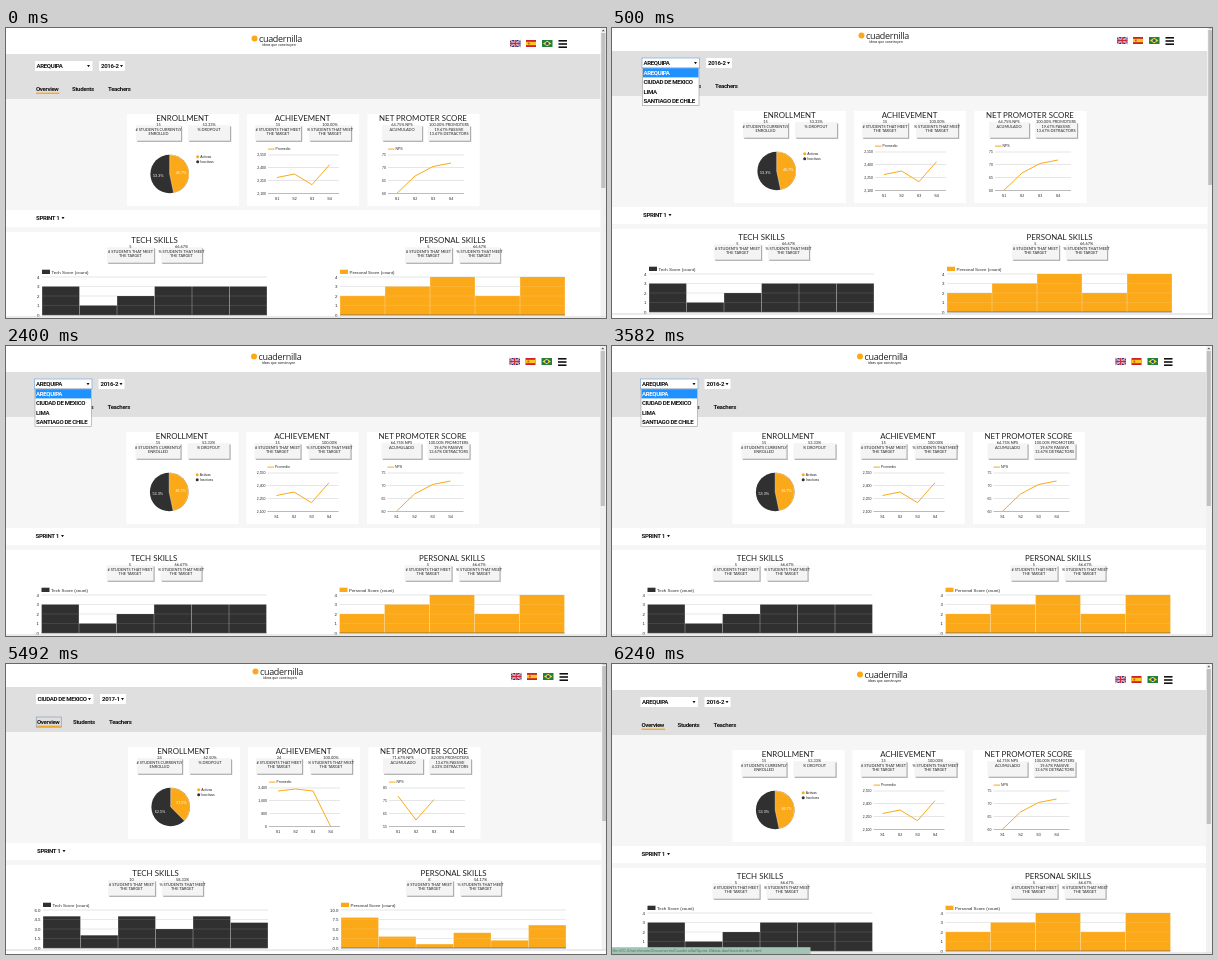
Animation, 600 px wide and 290 px high, one loop 8000 ms. Source, as an HTML page:

```html
<!DOCTYPE html>
<html lang="en">
<head>
<meta charset="utf-8">
<title>School dashboard</title>
<style>
html, body { margin: 0; width: 100%; height: 100%; overflow: hidden; background: #fff; }
svg { display: block; width: 600px; height: 290px; }
text { white-space: pre; fill: #222; }
.narrow { font-family: Roboto, "Liberation Sans", sans-serif; font-weight: 700; letter-spacing: -.35px; fill: #111; }
.wide { font-family: Lato, sans-serif; }
.chart { font-family: "Liberation Sans", Arial, sans-serif; }
.logo { font-family: "Open Sans", "Noto Sans", sans-serif; letter-spacing: -.3px; }
</style>
</head>
<body>
<svg id="stage" viewBox="0 0 600 290"></svg>
<script>
const ORANGE = '#fba919', DARK = '#303030';

const rect = (x, y, w, h, fill, more = '') =>
  `<rect x="${x}" y="${y}" width="${w}" height="${h}" fill="${fill}" ${more}/>`;
const path = (d, more) => `<path d="${d}" ${more}/>`;
const circle = (x, y, r, fill) => `<circle cx="${x}" cy="${y}" r="${r}" fill="${fill}"/>`;
// y is the vertical middle of the capitals
const text = (x, y, str, size, cls, more = '') =>
  `<text x="${x}" y="${y + size * .36}" font-size="${size}" class="${cls}" ${more}>${str}</text>`;
const label = (x, y, str, more) => text(x, y, str, 6.1, 'narrow', more);
const MID = 'text-anchor="middle"', END = 'text-anchor="end"';
const heading = (x, y, str) => text(x, y, str, 7.9, 'wide', MID);
const arrow = (x, y) => path(`M${x - 1.5} ${y - 1}h3l-1.5 2.2z`, 'fill="#111"');

const cities = ['AREQUIPA', 'CIUDAD DE MEXICO', 'LIMA', 'SANTIAGO DE CHILE'];
const arequipa = {
  city: cities[0], term: '2016-2',
  enroll: ['15', '53.33%'], achieve: ['15', '100.00%'],
  nps: ['64.75% NPS', '100.00% PROMOTERS', '19.67% PASSIVE', '13.67% DETRACTORS'],
  active: 46.7,
  scoreAxis: ['2,550', '2,400', '2,250', '2,100'], score: [149.5, 146, 156.7, 136.7],
  npsAxis: [75, 70, 65, 60], npsLine: [165.2, 148, 138.5, 135],
  tech: { stats: ['5', '66.67%'], bars: [3, 1, 2, 3, 3, 3], step: 1, digits: 0 },
  personal: { stats: ['5', '66.67%'], bars: [2, 3, 4, 2, 4], step: 1, digits: 0 }
};
const mexico = {
  city: cities[1], term: '2017-1',
  enroll: ['24', '62.50%'], achieve: ['24', '100.00%'],
  nps: ['71.67% NPS', '82.00% PROMOTERS', '13.67% PASSIVE', '4.33% DETRACTORS'],
  active: 37.5,
  scoreAxis: ['2,400', '1,600', '800', '0'], score: [130, 128, 130, 165.2],
  npsAxis: [85, 75, 65, 55], npsLine: [135, 159, 138.5],
  tech: { stats: ['10', '58.33%'], bars: [5, 2, 5, 3, 5, 4], step: 1.5, digits: 1 },
  personal: { stats: ['8', '54.17%'], bars: [8, 3, 1, 4, 2, 6], step: 2.5, digits: 1 }
};

const scenes = [
  { at: 0, dx: 0, dy: 0, data: arequipa },
  { at: 500, dx: 1, dy: -3, data: arequipa, open: true },
  { at: 2400, dx: -.5, dy: 0, data: arequipa, open: true },
  { at: 4370, dx: 1, dy: -3, data: mexico, focus: true },
  { at: 6240, dx: -.5, dy: 0, data: arequipa, status: true }
];

function flags() {
  const uk = rect(504, 12, 10.5, 7, '#22357c') +
    path('M504 12l10.5 7m0-7l-10.5 7', 'stroke="#fff" stroke-width="1.2"') +
    path('M504 12l10.5 7m0-7l-10.5 7', 'stroke="#d0243a" stroke-width=".5"') +
    path('M509.2 12v7m-5.2-3.5h10.5', 'stroke="#fff" stroke-width="2.1"') +
    path('M509.2 12v7m-5.2-3.5h10.5', 'stroke="#d0243a" stroke-width="1.3"');
  const spain = rect(520, 12, 10, 7, '#cc1f26') + rect(520, 13.8, 10, 3.4, '#fcc71e') +
    rect(522, 14.5, 1.7, 2, '#b5642c');
  const brazil = rect(536, 12, 10.5, 7, '#23803a') +
    path('M537 15.5l4.2-2.8 4.2 2.8-4.2 2.8z', 'fill="#f5d83a"') + circle(541.2, 15.5, 1.6, '#2d4a8c');
  return uk + spain + brazil;
}

function header(s) {
  const { city, term } = s.data;
  let out = rect(-5, -5, 610, 31, '#fff') +
    circle(248.5, 10.5, 3, ORANGE) +
    text(274.5, 10.5, 'cuadernilla', 9, 'logo', MID) +
    text(273, 16.7, 'ideas que construyen', 3.6, 'wide', MID) + flags();
  for (const y of [12, 15.2, 18.4]) out += rect(552.5, y, 8.5, 1.6, '#111');
  out += rect(-5, 26, 599.5, 45, '#dfdfdf') +
    rect(29, 33, 57.5, 10, '#fff', s.open ? 'stroke="#7da7d9" stroke-width=".7"' : '') +
    label(30.5, 38, city) + arrow(82.5, 38) +
    rect(93, 33, 26, 10, '#fff') + label(95, 38, term) + arrow(115.5, 38);
  ['Overview', 'Students', 'Teachers'].forEach((tab, i) => {
    out += label(30 + 36 * i, 60.8, tab);
  });
  out += rect(30, 64.6, 23.5, 1.4, ORANGE);
  if (s.focus) out += rect(29.3, 56, 25, 10.2, 'none', 'stroke="#8d9db5" stroke-width=".7"');
  return out;
}

const stat = (x, w, y, lines) =>
  rect(x + 1.2, y + 1.2, w, 15.5, '#777', 'opacity=".6" filter="url(#soft)"') +
  rect(x, y, w, 15.5, '#f4f4f4') +
  lines.map((l, i) => text(x + w / 2, y - .2 + i * 4.4, l, 3.9, 'wide', MID)).join('');

const card = (x, title) => rect(x, 86, 112, 92, '#fff') + heading(x + 55.5, 90, title);
const target = sign => [sign + ' STUDENTS THAT MEET', 'THE TARGET'];

function pie(active) {
  const a = active / 100 * 2 * Math.PI, x = 163.7, y = 146, r = 19.3;
  const share = (turn, value) => text(x + 11.5 * Math.sin(turn), y - 11.5 * Math.cos(turn),
    value.toFixed(1) + '%', 3.7, 'chart', MID + ' style="fill:#fff"');
  return circle(x, y, r, DARK) +
    path(`M${x} ${y}V${y - r}A${r} ${r} 0 0 1 ${x + r * Math.sin(a)} ${y - r * Math.cos(a)}z`,
      `fill="${ORANGE}" stroke="#fff" stroke-width=".4"`) +
    share(a / 2, active) + share(a / 2 + Math.PI, 100 - active) +
    circle(191.7, 128.8, 1.5, ORANGE) + text(194.3, 128.8, 'Activas', 3.4, 'chart') +
    circle(191.7, 133.8, 1.5, DARK) + text(194.3, 133.8, 'Inactivas', 3.4, 'chart');
}

function lineChart(x, w, name, axis, ys) {
  const px = i => x + 9 + i * (w === 71 ? 17.5 : 18);
  let out = rect(x, 120.6, 6.5, 1, ORANGE) + text(x + 7.5, 121.1, name, 3.5, 'chart');
  axis.forEach((v, i) => {
    const y = 127 + i * 12.75;
    out += rect(x, y - .25, w, .5, i < 3 ? '#ccc' : '#777') + text(x - 2, y, v, 3.5, 'chart', END);
  });
  for (let i = 0; i < 4; i++) out += text(px(i), 170.5, 'S' + (i + 1), 3.7, 'chart', MID);
  return out + path('M' + ys.map((y, i) => px(i) + ' ' + y).join('L'),
    `fill="none" stroke="${ORANGE}" stroke-width="1"`);
}

function skills(x, title, name, color, { stats, bars, step, digits }) {
  const mid = x + 112.5, w = 225 / bars.length, base = 287, unit = 9.5 / step;
  let out = heading(mid, 212, title) +
    stat(mid - 47.5, 47, 219.2, [stats[0], ...target('#')]) +
    stat(mid + 6.5, 41, 219.2, [stats[1], ...target('%')]) +
    rect(x, 241.7, 8, 4.3, color) + text(x + 9.5, 244, name + ' Score (count)', 4.4, 'chart');
  for (let i = 0; i < 5; i++) {
    const y = base - i * 9.5;
    out += rect(x, y - .25, 225, .5, '#ccc') +
      text(x - 2.5, y, (i * step).toFixed(digits), 4.4, 'chart', END);
  }
  bars.forEach((v, i) => {
    out += rect(x + i * w + .15, base - v * unit, w - .3, v * unit, color);
  });
  for (let i = 1; i < 4; i++) out += rect(x, base - i * 9.5 - .15, 225, .3, '#fff', 'opacity=".35"');
  return out + rect(x, base - .3, 225, .6, '#555');
}

function menu() {
  return rect(29.5, 43, 56.5, 37.5, '#fff', 'stroke="#999" stroke-width=".6"') +
    rect(30, 43.2, 55.5, 9.2, '#1e90ff') +
    cities.map((c, i) => label(30.5, 47.8 + i * 9.4, c, i ? '' : 'style="fill:#fff"')).join('');
}

function draw(s) {
  const d = s.data;
  let out = rect(-5, 71, 599.5, 111, '#f6f6f6') + rect(-5, 199, 599.5, 5, '#f6f6f6') + header(s);

  out += card(121, 'ENROLLMENT') +
    stat(130, 45, 97.2, [d.enroll[0], '# STUDENTS CURRENTLY', 'ENROLLED']) +
    stat(182, 42, 97.2, [d.enroll[1], '% DROPOUT']) + pie(d.active);
  out += card(241, 'ACHIEVEMENT') +
    stat(249, 46, 97.2, [d.achieve[0], ...target('#')]) +
    stat(303, 42, 97.2, [d.achieve[1], ...target('%')]) +
    lineChart(262, 71, 'Promedio', d.scoreAxis, d.score);
  out += card(361.5, 'NET PROMOTER SCORE') +
    stat(376, 40, 97.2, [d.nps[0], 'ACUMULADO']) + stat(422, 42, 97.2, d.nps.slice(1)) +
    lineChart(382, 76, 'NPS', d.npsAxis, d.npsLine);

  out += label(30, 190, 'SPRINT 1') + arrow(57, 190) +
    skills(36, 'TECH SKILLS', 'Tech', DARK, d.tech) +
    skills(334, 'PERSONAL SKILLS', 'Personal', ORANGE, d.personal);
  if (s.open) out += menu();

  out += rect(594.5, -5, 10, 294, '#f1f1f1') + rect(595.2, 5, 4.2, 155, '#c1c1c1') +
    path('M595.8 3.2h3l-1.5-1.8z', 'fill="#555"') +
    rect(-5, 288.8, 610, 6, '#fff') + rect(-5, 288.7, 610, .6, '#bbb');
  if (s.status) out += rect(-5, 283.2, 204, 7, '#a3c4b4') +
    text(1, 286.6, 'file:///C:/Users/marin/Documents/Cuadernilla/Sprint 2/data-dashboard/index.html',
      4.2, 'chart', 'style="fill:#4f7a69"');

  return '<defs><filter id="soft" x="-20%" y="-30%" width="140%" height="160%">' +
    '<feGaussianBlur stdDeviation=".7"/></filter></defs>' +
    `<g transform="translate(${s.dx} ${s.dy})">${out}</g>`;
}

const stage = document.getElementById('stage');
let shown;
function tick() {
  const t = performance.now() % 8000;
  const scene = scenes.findLast(s => t >= s.at);
  if (scene !== shown) stage.innerHTML = draw(shown = scene);
  requestAnimationFrame(tick);
}
tick();
</script>
</body>
</html>
```
